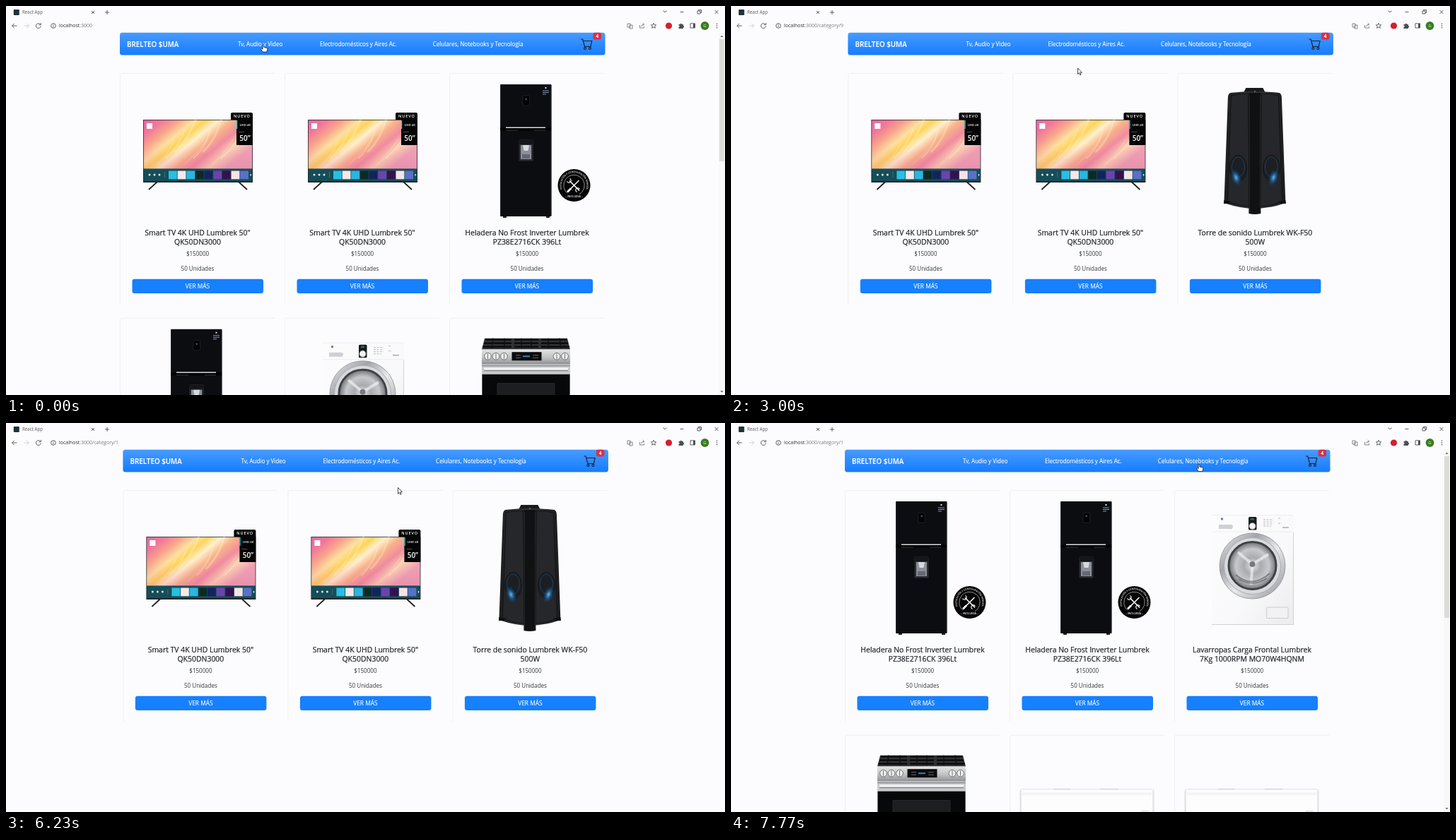
These frames come from a looping animation (1017 px wide and 551 px high, 8 s). An HTML page:

```html
<!DOCTYPE html>
<html lang="es">
<head>
<meta charset="utf-8">
<title>React App</title>
<style>
  html, body { margin: 0; width: 100%; height: 100%; overflow: hidden; background: #fcfcfe; }
  svg { display: block; }
  #stage { width: 100vw; height: 100vh; }
  text { font-family: "Open Sans", "Noto Sans", sans-serif; fill: #212529; }
  .mid { text-anchor: middle; }
  .title { font-size: 10.45px; font-weight: 500; stroke: #212529; stroke-width: .22px; }
  .body { font-size: 8.05px; fill: #33373b; }
  .nav text, .btn { fill: #fff; font-size: 8.05px; stroke: #fff; stroke-width: .12px; }
  .nav .brand { font-size: 9.85px; font-weight: 600; }
  .line { fill: none; stroke: #4a4d51; stroke-width: .9; }
</style>
</head>
<body>
<svg id="stage" viewBox="0 0 1017 551" preserveAspectRatio="none">
  <defs>
    <linearGradient id="bar" x2="0" y2="1">
      <stop stop-color="#479bff"/><stop offset="1" stop-color="#167cff"/>
    </linearGradient>
    <linearGradient id="screen" x2="1" y2=".55">
      <stop stop-color="#dd6aa6"/><stop offset=".13" stop-color="#f2789a"/>
      <stop offset=".25" stop-color="#f9a58c"/><stop offset=".36" stop-color="#fde0a0"/>
      <stop offset=".44" stop-color="#ffd45c"/><stop offset=".53" stop-color="#fff0cf"/>
      <stop offset=".63" stop-color="#f9b48a"/><stop offset=".75" stop-color="#f08ca0"/>
      <stop offset=".87" stop-color="#fbd3b2"/><stop offset="1" stop-color="#eea2b4"/>
    </linearGradient>
    <linearGradient id="screenShade" x2="0" y2="1">
      <stop offset=".5" stop-color="#e75aa0" stop-opacity="0"/>
      <stop offset="1" stop-color="#d9589a" stop-opacity=".22"/>
    </linearGradient>
    <linearGradient id="steel" x2="0" y2="1">
      <stop stop-color="#e4e5e6"/><stop offset=".55" stop-color="#bfc1c3"/><stop offset="1" stop-color="#8d8f92"/>
    </linearGradient>
    <linearGradient id="chrome" x2="1" y2="1">
      <stop stop-color="#eeeff1"/><stop offset=".3" stop-color="#a2a5aa"/>
      <stop offset=".55" stop-color="#e9eaec"/><stop offset="1" stop-color="#8f9298"/>
    </linearGradient>
    <linearGradient id="shell" x2="1" y2="1">
      <stop stop-color="#fcfcfd"/><stop offset=".6" stop-color="#f9f9fb"/><stop offset="1" stop-color="#ebebef"/>
    </linearGradient>
    <linearGradient id="tower" x2="1">
      <stop stop-color="#1c1d1f"/><stop offset=".4" stop-color="#303235"/>
      <stop offset=".6" stop-color="#303235"/><stop offset="1" stop-color="#1a1b1d"/>
    </linearGradient>
    <radialGradient id="glass">
      <stop stop-color="#e3e4e6"/><stop offset=".35" stop-color="#a9abae"/>
      <stop offset=".7" stop-color="#c6c8cb"/><stop offset="1" stop-color="#6e7175"/>
    </radialGradient>
    <radialGradient id="glow">
      <stop stop-color="#65bdf5"/><stop offset=".4" stop-color="#2570b0" stop-opacity=".7"/>
      <stop offset="1" stop-color="#123" stop-opacity="0"/>
    </radialGradient>
    <path id="ring" d="M163.5 171A17.8 17.8 0 1 1 189.5 171"/>

    <g id="tv">
      <path d="M53 154L41 165M168 154L180 165" stroke="#1b1c1e" stroke-width="1.8"/>
      <rect x="33" y="66" width="155" height="89" fill="#23262b"/>
      <rect x="33.8" y="66.8" width="153.4" height="69" fill="url(#screen)"/>
      <rect x="33.8" y="66.8" width="153.4" height="69" fill="url(#screenShade)"/>
      <g id="streaks" fill="none" stroke="#fff3c8" stroke-opacity=".3"></g>
      <rect x="38" y="71" width="8" height="8" fill="#fff"/>
      <rect x="33.8" y="135.5" width="153.4" height="17.5" fill="#154d58"/>
      <g fill="#dfe9ea"><circle cx="42" cy="144" r="1.5"/><circle cx="49" cy="144" r="1.5"/><circle cx="56" cy="144" r="1.5"/></g>
      <path d="M63.5 140v8" stroke="#79979d" stroke-width=".5"/>
      <g id="tiles"></g>
      <path d="M184.5 142.500l1.800 1.800l-1.800 1.800z" fill="#fff"/>
      <path d="M157 66V58a2 2 0 0 1 2-2H186a2 2 0 0 1 2 2V102H165V66z" fill="#050506"/>
      <path d="M165.6 67v12" stroke="#1fd0d8" stroke-width="1.3"/>
      <path d="M168 83.500h8" stroke="#999" stroke-width=".5"/>
      <g font-weight="600">
        <text x="172.8" y="63.4" class="mid" style="fill:#fff;font-size:5.5px;letter-spacing:.9px">NUEVO</text>
        <text x="177.2" y="74.5" class="mid" style="fill:#fff;font-size:4.2px">UHD 4K</text>
        <text x="177" y="96.2" class="mid" style="fill:#fff;font-size:10px">50”</text>
      </g>
    </g>

    <g id="fridge">
      <path d="M76 202h5v3h-5zM137 202h5v3h-5z" fill="#222"/>
      <rect x="72" y="16" width="72.5" height="187" rx="1" fill="#0c0d11"/>
      <path d="M72.5 17v185M144 17v185" stroke="#30323a" stroke-width=".7"/>
      <rect x="104" y="32" width="9.5" height="14" rx="1" fill="#020203" stroke="#343740" stroke-width=".5"/>
      <circle cx="108.7" cy="37" r="1.3" fill="#52565d"/>
      <rect x="135.5" y="20" width="2" height="2" fill="#dfe2e6"/>
      <path d="M132 25h9M132 27.500h9M132 30h5" stroke="#8097b4" stroke-width="1.1"/>
      <path d="M72 79.500h72" stroke="#000" stroke-width="4"/>
      <path d="M80 77.300h56" stroke="#d9dce0" stroke-width="1.4"/>
      <path d="M80 81h17M120 81h16" stroke="#373a40"/>
      <rect x="98.5" y="94.5" width="20" height="30" rx="1" fill="#2a2d33"/>
      <rect x="99" y="95" width="19" height="6" fill="#14161a"/>
      <rect x="101" y="102" width="15" height="20" fill="#8c8f98"/>
      <path d="M104 102h9l-1.500 8h-6z" fill="#d7d9de"/>
      <path d="M103 115h11v6h-11z" fill="#656872"/>
      <g fill="none" stroke="#fff">
        <circle cx="176.5" cy="159" r="23" fill="#050506" stroke="none"/>
        <circle cx="176.5" cy="159" r="14.7" stroke-width=".5" stroke-dasharray="74 18.36" transform="rotate(130 176.5 159)"/>
        <path d="M170 152.500l14 14M183.500 152L169 166.500" stroke-width="1.5"/>
        <path d="M170.500 149.500a3 3 0 1 1-4 4M180.500 168.500a3 3 0 1 1 4-4" stroke-width="1.1"/>
        <path d="M167 168.500l5-5" stroke-width="2.6"/>
      </g>
      <g font-weight="600">
        <text style="fill:#fff;font-size:3.3px"><textPath href="#ring" startOffset="50%" text-anchor="middle">INSTALACIÓN Y CONFIGURACIÓN REMOTA</textPath></text>
        <text x="176.5" y="176.3" class="mid" style="fill:#fff;font-size:4px">– INCLUIDA –</text>
      </g>
    </g>

    <g id="washer">
      <rect x="53" y="35" width="116" height="156" rx="2" fill="url(#shell)"/>
      <path d="M53 190.500h116M168.500 60v130" stroke="#c9c9cf" stroke-width=".8"/>
      <path d="M54 59h114M54 35.500h114" stroke="#e4e4e8" stroke-width=".6"/>
      <rect x="66" y="39.5" width="3" height="3" fill="#6e7b9b"/>
      <path d="M63 49h18a3 3 0 0 1-3 6H63z" fill="#cfd0d4"/>
      <rect x="105" y="38" width="11.5" height="18.5" rx="1.5" fill="#17191b"/>
      <rect x="108" y="40" width="5" height="2.5" fill="#3f6656"/>
      <circle cx="110.5" cy="51" r="4.6" fill="#f3f3f4" stroke="#777" stroke-width=".7"/>
      <g stroke="#a6a8b0" stroke-width=".8" stroke-dasharray="3 1.5">
        <path d="M126 42h14M126 45h14M126 48h14M126 51h11M147 40h4M147 47h5"/>
      </g>
      <path d="M153 53h9" stroke="#81858c"/>
      <circle cx="110.5" cy="107.5" r="46.5" fill="url(#chrome)" stroke="#8d9095" stroke-width=".8"/>
      <circle cx="110.5" cy="107.5" r="40" fill="#d9dadd" stroke="#aaacb1"/>
      <circle cx="110.5" cy="107" r="33.5" fill="url(#glass)" stroke="#3f4246" stroke-width="3"/>
      <path d="M110.500 105L90 88M110.500 105L133 91M110.500 105l-2 29" stroke="#f4f4f5" stroke-width="4" opacity=".65"/>
      <path d="M87 120q23 20 48-2M91 126q20 12 40-1" fill="none" stroke="#55595d" stroke-width="2" opacity=".6"/>
      <circle cx="110.5" cy="105" r="4" fill="#76797d"/>
      <rect x="130.5" y="166" width="30.5" height="15.5" rx="1" fill="#f2f2f5" stroke="#b9bac0" stroke-width=".7"/>
    </g>

    <g id="stove">
      <path d="M50 29H167L171 45H46z" fill="#303134"/>
      <path d="M51 31h37M92 31h34M130 31h36M49 36h39M92 36h34M130 36h38M47 41h41M92 41h34M130 41h40" stroke="#08090a" stroke-width="2.3"/>
      <path d="M62 29l-2 14M78 29v14M102 29v14M116 29v14M140 29v14M156 29l2 14" stroke="#111" stroke-width="1.5"/>
      <path d="M46 44.500H171V66H46z" fill="url(#steel)"/>
      <rect x="88.5" y="48.5" width="42" height="12" fill="#0a0b0d"/>
      <path d="M94 53h7M94 56.500h7M118 53h8M118 56.500h8" stroke="#777e88" stroke-width=".8"/>
      <path d="M104 54.500h10" stroke="#3e7fb5" stroke-width="2"/>
      <g id="knobs" fill="#eceded" stroke="#6c6e71"></g>
      <path d="M46 66H171V177H46z" fill="#c7c9cb"/>
      <path d="M46 68h125" stroke="#77797c"/>
      <path d="M49 72h119" stroke="#f3f4f4" stroke-width="3"/>
      <path d="M49 75h119" stroke="#75777a"/>
      <rect x="46.5" y="80" width="124" height="70" fill="#070809"/>
      <rect x="68" y="93" width="81" height="45" fill="#1d1e20" stroke="#34363a" stroke-width=".6"/>
    </g>

    <g id="aircon" fill="none" stroke="#dadbdf" stroke-width=".8">
      <rect x="15" y="77" width="189" height="58" rx="3" fill="#fdfdfd"/>
      <path d="M18 82.500h183M18 84.500h183" stroke="#e6e9e6"/>
      <path d="M62 77h24M128 77h26" stroke="#c0c2c5"/>
      <path d="M16 79v30M203 79v30" stroke="#c9ccd0"/>
      <path d="M186 108h11" stroke="#c5cbd3"/>
    </g>

    <g id="speaker">
      <path d="M97 21h24l4 8H93z" fill="#191a1c"/>
      <path d="M75 28Q109 24 144 28Q147 29 147.500 34L153 184Q130 192 109.500 192Q90 192 66 184L71.500 34Q72 29 75 28z" fill="url(#tower)"/>
      <path d="M76 32Q88 29 100 29L102 189Q84 188 71 181zM143 32Q131 29 119 29L117 189Q135 188 148 181z" fill="#25272a" stroke="#0d0e0f" stroke-width=".8"/>
      <path d="M66 180l10 2l-4 3h-6.500zM153 180l-10 2l4 3h6.500z" fill="#0d0e0f"/>
      <g fill="#1b1e22" stroke="#15171a"><ellipse cx="86" cy="135" rx="12" ry="19"/><ellipse cx="133" cy="135" rx="12" ry="19"/></g>
      <g fill="none" stroke="#235077" stroke-width=".7"><ellipse cx="86" cy="133" rx="9" ry="14"/><ellipse cx="133" cy="133" rx="9" ry="14"/></g>
      <ellipse cx="83" cy="148" rx="8" ry="14" fill="url(#glow)" transform="rotate(-20 83 148)"/>
      <ellipse cx="136" cy="148" rx="8" ry="14" fill="url(#glow)" transform="rotate(20 136 148)"/>
      <path d="M101 28h17v171q-8.500 2-17 0z" fill="#101113"/>
      <path d="M102 32v164M117 32v164" stroke="#33363a" stroke-width=".6"/>
      <circle cx="109.5" cy="26" r="1" fill="#777"/>
    </g>
  </defs>

  <rect width="1017" height="551" fill="#fcfcfe"/>

  <g id="browser">
    <rect x="10.8" y="5" width="8" height="8" rx="1" fill="#1e3238"/>
    <text x="23" y="11.2" style="font-size:6.2px;fill:#55585c">React App</text>
    <text x="75" y="30.4" style="font-size:6.97px;fill:#2b2e32">localhost<tspan id="path" fill="#777a7f"></tspan></text>
    <g class="line">
      <path d="M121 7l4 4m0-4l-4 4M140 9h6m-3-3v6M929.500 6.500l2.500 2.500l2.500-2.500M953.500 8.500h5M1002.500 6l5 5m0-5l-5 5"/>
      <path d="M978 7h4v4h-4zM979.500 7V5.500h4v4H982"/>
      <path d="M15.500 28h-7m3.200-3.200L8.500 28l3.200 3.200"/>
      <path d="M25.500 28h7m-3.200-3.200l3.200 3.200l-3.200 3.200" stroke="#c9cacd"/>
      <path d="M48.500 26a3.400 3.400 0 1 0 .7 2.500M49.300 24v2.700h-2.700"/>
      <circle cx="67" cy="28" r="3.3"/><path d="M67 27.400v2.400M67 25.800v.9"/>
      <path d="M896.500 27v4h6v-2M898.500 29q.5-3 4-3m-1.800-1.800l2 1.800l-2 1.800" stroke="#777"/>
      <path d="M916 24.300l1.100 2.400l2.600.3l-2 1.700l.6 2.600l-2.300-1.400l-2.300 1.400l.6-2.600l-2-1.700l2.600-.3z"/>
      <path d="M968 24.800h6.500v6.200H968z"/>
      <path d="M879 25h4v5h-4zM882 27h4v5h-4z" stroke="#777"/>
    </g>
    <path d="M972 25h2.500v6H972z" fill="#4a4d51"/>
    <path d="M951.500 26h2a1.200 1.200 0 1 1 2.400 0h2v2a1.200 1.200 0 1 1 0 2.400v1.600h-6.400v-2a1.200 1.200 0 1 0 0-2.400z" fill="#4a4d51"/>
    <circle cx="937.5" cy="28" r="4.6" fill="#d3202c"/>
    <circle cx="988.5" cy="28" r="5.9" fill="#397d20"/>
    <text x="988.5" y="30.2" class="mid" style="fill:#fff;font-size:6px">G</text>
    <g fill="#4a4d51"><circle cx="1005.5" cy="25.3" r=".8"/><circle cx="1005.5" cy="28" r=".8"/><circle cx="1005.5" cy="30.7" r=".8"/></g>
  </g>

  <g id="scroll">
    <rect x="1008" y="38" width="9" height="513" fill="#f8f8f9"/>
    <path d="M1010.300 44l2.200-2.500l2.200 2.500zM1010.300 545l2.200 2.500l2.200-2.500z" fill="#707276"/>
    <rect id="thumb" x="1009" y="47" width="7" height="173" fill="#dcdcd8"/>
  </g>

  <g id="site">
    <g class="nav">
      <rect x="161" y="37.8" width="686.5" height="31.6" rx="3.5" fill="url(#bar)"/>
      <text x="171" y="57.7" class="brand">BRELTEO $UMA</text>
      <text x="328" y="56.8">Tv, Audio y Video</text>
      <text x="444" y="56.8">Electrodomésticos y Aires Ac.</text>
      <text x="603.7" y="56.8">Celulares, Notebooks y Tecnología</text>
      <g fill="none" stroke="#15202e" stroke-width="1.15">
        <path d="M813 47h2.700l2.800 10.500h8.500l1.700-8h-12.400"/>
        <circle cx="819" cy="60" r="1.5"/><circle cx="826" cy="60" r="1.5"/>
      </g>
      <rect x="830.5" y="37.8" width="11.5" height="9.7" rx="3" fill="#dc2f48"/>
      <text x="836.2" y="45" class="mid" style="font-size:6.3px;font-weight:700">4</text>
    </g>
    <g id="pages"></g>
  </g>

  <path id="arrow" d="M0 0V8.600L2 6.800L3.300 9.800L4.600 9.200L3.300 6.300H6z" fill="#fff" stroke="#111" stroke-width=".75"/>
  <path id="hand" d="M-.9.800Q0-.6.900.8V4l4 .9q1 .4.900 1.500l-.8 4.200H-.6L-3.200 7q-.6-1.300.5-1.400L-.9 6.700z" fill="#fff" stroke="#111" stroke-width=".75"/>
</svg>

<script>
const LOOP = 8000;
const $ = id => document.getElementById(id);
const repeat = (n, fn) => Array.from({ length: n }, (_, i) => fn(i)).join('');

const tileColors = ['#27bfe4', '#f4e9ea', '#2ab6e0', '#0c2a24', '#14235c', '#6c43ad', '#35114f', '#f5e4e4', '#5a70c9'];
$('tiles').innerHTML = tileColors.map((c, i) =>
  `<rect x="${69 + i * 12.65}" y="138.5" width="11.8" height="11.8" fill="${c}"/>`).join('');
$('streaks').innerHTML = repeat(8, i => {
  const x = 52 + i * 13;
  return `<path d="M${x} ${130 - i % 3 * 9}q18-16 ${24 + i % 4 * 3}-${36 + i % 3 * 6}" stroke-width="${1 + i % 3}"/>`;
});
$('knobs').innerHTML = [54.5, 66, 77.5, 152, 163.5].map(x =>
  `<circle cx="${x}" cy="54.5" r="4.9"/><path d="M${x} 51v7"/>`).join('');

const products = {
  tv: ['Smart TV 4K UHD Lumbrek 50"', 'QK50DN3000'],
  fridge: ['Heladera No Frost Inverter Lumbrek', 'PZ38E2716CK 396Lt'],
  washer: ['Lavarropas Carga Frontal Lumbrek', '7Kg 1000RPM MO70W4HQNM'],
  speaker: ['Torre de sonido Lumbrek WK-F50', '500W'],
  stove: ['Cocina a Gas Lumbrek', '5 Hornallas'],
  aircon: ['Aire Acondicionado Lumbrek', 'Split Inverter']
};

function card(kind, i) {
  const [a, b] = products[kind];
  const label = (text, y, cls) => `<text x="110" y="${y}" class="mid ${cls}">${text}</text>`;
  return `<g transform="translate(${161 + i % 3 * 233} ${95 + Math.floor(i / 3) * 346.7})">
    <path d="M.5 328V3Q.5.5 3 .5H219" fill="none" stroke="#efeef1" stroke-width=".9"/>
    <path d="M3 329H217" stroke="#f8f7f9" stroke-width=".8"/>
    <use href="#${kind}"/>
    ${label(a, 230.3, 'title')}${label(b, 243, 'title')}
    ${label('$150000', 259, 'body')}${label('50 Unidades', 280, 'body')}
    <rect x="17.5" y="291.8" width="185.5" height="20.2" rx="3.2" fill="#1680ff"/>
    <text x="110" y="305" class="mid btn" style="font-size:8.4px">VER MÁS</text></g>`;
}

// start time, horizontal shift, scroll thumb height (0 = no scrollbar), cards
const pages = [
  { at: 0, shift: 0, thumb: 173, items: 'tv tv fridge fridge washer stove' },
  { at: 3000, shift: 4.4, thumb: 0, items: 'tv tv speaker' },
  { at: 6770, shift: 0, thumb: 229, items: 'fridge fridge washer stove aircon aircon' }
];
$('pages').innerHTML = pages.map(p => `<g>${p.items.split(' ').map(card).join('')}</g>`).join('');
const pageNodes = [...$('pages').children];

const urls = [[0, ':3000'], [970, ':3000/category/9'], [4770, ':3000/category/1']];

// pointer tip: time, x, y
const path = [
  [0, 364, 54.5], [1100, 364, 54.5], [1570, 468, 91], [1900, 468, 91], [2230, 490.5, 88],
  [3900, 490.5, 88], [4300, 521, 56], [5000, 521, 56], [5130, 522.5, 61], [5530, 537, 92.5],
  [5970, 537, 92.5], [6230, 554.5, 91.5], [6870, 554.5, 91.5], [7570, 663, 64],
  [7600, 663, 64], [7770, 662, 58], [LOOP, 662, 58]
];
const links = [[324, 398], [440, 558], [599, 737]];

function pointerAt(t) {
  const i = Math.max(1, path.findIndex(p => p[0] > t));
  const [t0, x0, y0] = path[i - 1], [t1, x1, y1] = path[i];
  const u = (t - t0) / (t1 - t0), e = u * u * (3 - 2 * u);
  return [x0 + (x1 - x0) * e, y0 + (y1 - y0) * e];
}

const show = (node, on) => node.setAttribute('visibility', on ? 'visible' : 'hidden');

function draw(t) {
  const page = pages.findLast(p => p.at <= t);
  pageNodes.forEach((n, i) => { n.style.display = pages[i] === page ? '' : 'none'; });
  $('site').setAttribute('transform', `translate(${page.shift} 0)`);
  show($('scroll'), page.thumb > 0);
  $('thumb').setAttribute('height', page.thumb);
  $('path').textContent = urls.findLast(u => u[0] <= t)[1];

  const [x, y] = pointerAt(t);
  const over = y > 43 && y < 65 && links.some(([a, b]) => x - page.shift > a && x - page.shift < b);
  for (const id of ['arrow', 'hand']) {
    $(id).setAttribute('transform', `translate(${x.toFixed(1)} ${y.toFixed(1)})`);
    show($(id), (id === 'hand') === over);
  }
}

const start = performance.now();
function tick() {
  draw((performance.now() - start) % LOOP);
  requestAnimationFrame(tick);
}
tick();
</script>
</body>
</html>
```
